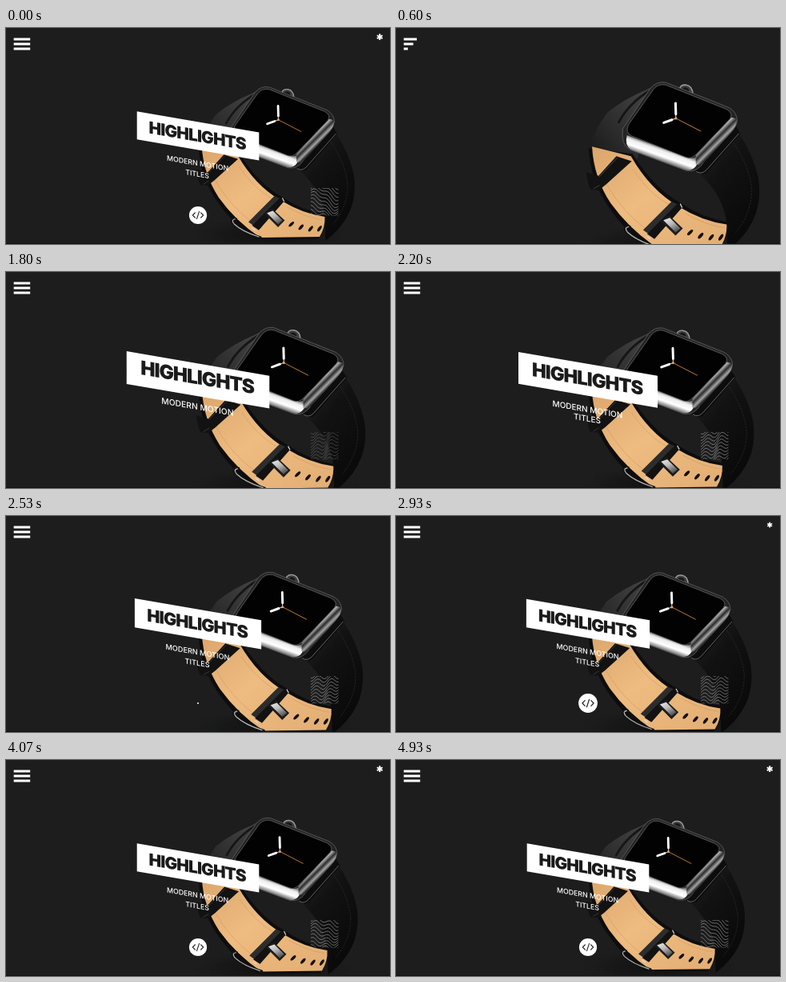
Recreate the animation shown at these times as an HTML page. Size 480 by 270 pixels, loop 4.99 s.

```html
<!DOCTYPE html>
<html lang="en">
<head>
<meta charset="utf-8">
<title>Highlights</title>
<style>
  html, body { margin: 0; width: 100%; height: 100%; overflow: hidden; background: #1d1d1d; }
  svg { display: block; width: 100vw; height: 100vh; }
  text { font-family: Inter, "Open Sans", sans-serif; text-anchor: middle; }
  .head { font-size: 20.8px; font-weight: 900; letter-spacing: -.87px; fill: #1b1b1b; }
  .sub { font-size: 8.8px; font-weight: 500; fill: #fff; }
  .line { fill: none; stroke-linecap: round; stroke-linejoin: round; }
</style>
</head>
<body>
<svg viewBox="0 0 480 270">
  <defs>
    <linearGradient id="tan" x1="0" y1="0" x2="1" y2="1">
      <stop offset="0" stop-color="#dba66b"/><stop offset=".45" stop-color="#eebb80"/><stop offset="1" stop-color="#e2ae73"/>
    </linearGradient>
    <linearGradient id="strap" x1="0" y1="0" x2=".6" y2="1">
      <stop offset="0" stop-color="#262626"/><stop offset=".4" stop-color="#121212"/><stop offset="1" stop-color="#090909"/>
    </linearGradient>
    <linearGradient id="back" x1="1" y1="0" x2="0" y2="1">
      <stop offset="0" stop-color="#4a4a4a"/><stop offset=".5" stop-color="#303030"/><stop offset="1" stop-color="#121212"/>
    </linearGradient>
    <linearGradient id="front" gradientUnits="userSpaceOnUse" x1="347" y1="154" x2="341" y2="171">
      <stop offset="0" stop-color="#777"/><stop offset=".25" stop-color="#eee"/><stop offset=".6" stop-color="#fff"/><stop offset="1" stop-color="#555"/>
    </linearGradient>
    <linearGradient id="side" gradientUnits="userSpaceOnUse" x1="393" y1="138" x2="402" y2="147">
      <stop offset="0" stop-color="#aaa"/><stop offset=".35" stop-color="#2c2c2c"/><stop offset=".7" stop-color="#a5a5a5"/><stop offset="1" stop-color="#222"/>
    </linearGradient>
    <linearGradient id="tang" x2=".6" y2="1">
      <stop offset="0" stop-color="#eee"/><stop offset=".5" stop-color="#bbb"/><stop offset="1" stop-color="#555"/>
    </linearGradient>
    <radialGradient id="shade">
      <stop offset="0" stop-color="#0f0f0f"/><stop offset=".6" stop-color="#151515" stop-opacity=".6"/><stop offset="1" stop-color="#1d1d1d" stop-opacity="0"/>
    </radialGradient>
    <clipPath id="square"><rect x="381" y="200" width="34.5" height="34.5"/></clipPath>
    <clipPath id="panelClip"><rect id="panelMask" x="-76.3" y="-17.5" width="152.6" height="35"/></clipPath>
  </defs>

  <rect width="480" height="270" fill="#1d1d1d"/>
  <rect y="269" width="480" height="1" fill="#190d12"/>

  <g id="watch">
    <ellipse cx="338" cy="268" rx="118" ry="26" fill="url(#shade)"/>
    <!-- far side of the strap -->
    <path d="M330 69L312 78Q285 89 264 106Q246 130 240 152L246 182L300 165Z" fill="url(#back)"/>
    <path d="M316 79Q290 95 278 118" class="line" stroke="#161616" stroke-width="3"/>
    <!-- near right strap -->
    <path d="M425 130Q444 158 450 186Q454 209 447 231Q437 258 412 276L411 245Q409 210 376 180Z" fill="url(#strap)"/>
    <path class="line" d="M419 143Q439 171 442 201Q442 230 422 254" stroke="#2e2e2e" stroke-width=".7" stroke-dasharray="2 2"/>
    <!-- tan lining -->
    <path d="M241 150Q243 190 265 222Q288 256 318 274L402 274Q415 258 412 241Q381 236 353 217Q321 199 295 157Z" fill="#0d0d0d"/>
    <path d="M245 148Q247 186 268 218Q291 250 324 272L404 271Q412 258 411 244Q381 240 352 222Q317 202 293 160Z" fill="url(#tan)"/>
    <path class="line" d="M263 194Q282 228 312 250M296 177Q316 207 344 222M361 231Q384 244 407 248" stroke="#c18f58" stroke-width=".6" stroke-dasharray="1.6 1.6"/>
    <!-- keeper -->
    <path d="M238 180L253 184L275 160L294 166L262 195L253 202L243 201Q239 192 238 180Z" fill="#121212"/>
    <path class="line" d="M254 185L276 162M247 200L254 196" stroke="#393939"/>
    <!-- buckle -->
    <path class="line" d="M291 247Q282 247 288 254Q300 265 324 272" stroke="#151515" stroke-width="4"/>
    <path class="line" d="M290 247Q284 248 289 254Q300 264 322 271" stroke="#b9b9b9" stroke-width="1.2"/>
    <path d="M308 251L343 216L357 222L322 261Z" fill="#2c2c2c"/>
    <path d="M313 256L350 219L357 222L322 262Z" fill="#121212"/>
    <path class="line" d="M354 219L356 223M313 259L317 262" stroke="#ddd" stroke-width="1.2"/>
    <path d="M330 240L340 233L357 249L348 258Z" fill="#1c1c1c"/>
    <path d="M333 239L341 236L354 249L348 254Z" fill="url(#tang)"/>
    <g id="holes" fill="#15100b"></g>
    <!-- crown -->
    <path d="M353 79Q353 71 361 71.5Q370 73 370 86Z" fill="#3c3c3c"/>
    <path class="line" d="M353 77Q354 71.5 361 72Q369 73 369.5 84" stroke="#9a9a9a" stroke-width="1.5"/>
    <ellipse cx="360" cy="79" rx="4.5" ry="4" fill="#161616"/>
    <!-- lug and case -->
    <path d="M370 176L422 122L428 132L386 181Q380 184 370 176Z" fill="#0d0d0d"/>
    <path class="line" d="M374 179Q380 183 386 177L426 132" stroke="#707070" stroke-width=".9"/>
    <path d="M317 76Q325 67 336 69L414 100Q424 106 424 116Q423 124 416 131L383 167Q375 180 362 178L292 152Q280 146 283 126Z" fill="#242424" stroke="#5c5c5c" stroke-width=".9"/>
    <path d="M288 134L361 161Q368 164 373 161L374 171Q369 179 360 177L293 152Q285 147 288 134Z" fill="url(#front)"/>
    <path d="M373 159L417 112L424 114Q423 124 416 131L383 167Q376 172 373 170Z" fill="url(#side)"/>
    <path class="line" d="M321 77Q327 70 336 72L411 102Q420 107 415 114L373 158Q367 164 360 161L294 135Q285 131 290 121Z" fill="#020202" stroke="#606060" stroke-width=".9" style="fill:#020202"/>
    <!-- dial -->
    <path class="line" d="M348.4 113.2L379 129" stroke="#d98a3c" stroke-width=".9"/>
    <path class="line" d="M348.4 113.2L348 94M348.4 113.2L333 118.8" stroke="#ddd"/>
    <path class="line" d="M348.4 108L348 94.5M343.5 115L333.5 118.6" stroke="#fff" stroke-width="3"/>
    <circle cx="348.4" cy="113.2" r="1.6" fill="#e3a15d"/>
  </g>

  <g id="waves" class="line" clip-path="url(#square)" stroke="#fff" stroke-width=".6"></g>

  <g id="title">
    <g transform="skewY(9.75)">
      <rect id="panel" x="-76.3" y="-17.5" width="152.6" height="35" fill="#fff"/>
      <g clip-path="url(#panelClip)"><text id="head" class="head" x="-.8" y="7.3">HIGHLIGHTS</text></g>
      <text id="sub1" class="sub" x="-.5" y="37.4">MODERN MOTION</text>
      <text id="sub2" class="sub" x="-.9" y="51">TITLES</text>
    </g>
  </g>

  <g id="icon">
    <circle r="11.1" fill="#fff"/>
    <path class="line" d="M-3.6 -3.2L-6.6 0L-3.6 3.2M3.6 -3.2L6.6 0L3.6 3.2M1.5 -4.4L-1.5 4.4" stroke="#1d1d1d" stroke-width="1.1"/>
  </g>

  <g id="burger" fill="#fff"></g>
  <path id="star" d="M0 -3.9V3.9M-3.4 -1.95L3.4 1.95M-3.4 1.95L3.4 -1.95" stroke="#fff" stroke-width="2"/>
</svg>
<script>
const LOOP = 4990, FPS = 15;
const $ = id => document.getElementById(id);
const set = (el, attrs) => { for (const k in attrs) el.setAttribute(k, attrs[k]); };
const add = (parent, tag, attrs = {}) => {
  const el = document.createElementNS("http://www.w3.org/2000/svg", tag);
  set(el, attrs);
  return parent.appendChild(el);
};
const clamp = v => Math.min(1, Math.max(0, v));
const easeOut = (t, from, to) => 1 - (1 - clamp((t - from) / (to - from))) ** 3;

// Linear interpolation through [time, value] steps
function track(t, steps) {
  let [t0, v0] = steps[0];
  for (const [t1, v1] of steps) {
    if (t < t1) return t1 === t0 ? v1 : v0 + (v1 - v0) * clamp((t - t0) / (t1 - t0));
    t0 = t1; v0 = v1;
  }
  return v0;
}

const TITLE = [[1270, 1.18], [1800, 1.17], [2130, 1.16], [2270, 1.12], [2400, 1.07],
               [2530, 1.037], [2670, 1.023], [3000, 1.008], [3400, 1]];
const ICON = [[2460, 0], [2530, .09], [2670, .55], [2800, .95], [3000, 1.13],
              [3200, 1.13], [3400, 1.1], [3730, 1.04], [4070, 1]];

const bars = [12, 18, 24].map(y => add($("burger"), "rect", { x: 9.7, y: y + .5, height: 3 }));
const waves = Array.from({ length: 22 }, () => add($("waves"), "path"));
[[366, 254], [379, 258], [392, 260], [404, 260]].forEach(([x, y], i) =>
  add($("holes"), "ellipse", { rx: 1.9, ry: 4.6, transform: `translate(${x} ${y}) rotate(${46 - i * 4})` }));

function drawWaves(t) {
  const p = clamp((t - 1700) / 3230);
  waves.forEach((path, i) => {
    let d = "";
    for (let x = 0; x <= 36; x += 1.5) {
      const bend = (3.2 - p) * Math.sin(x * .36 - 1 + p * 2.4 + i * .25);
      const slope = (30 * p - 16) / (1 + Math.exp((20 - x) / 5));
      const y = 176 + i * 4 + bend + slope + 2 * p * Math.sin(i * .5 + x * .12);
      d += `${d ? "L" : "M"}${381 + x} ${y.toFixed(2)}`;
    }
    set(path, { d });
  });
  set($("waves"), { opacity: .65 * track(t, [[1600, 0], [1800, .5], [2200, 1]]) });
}

function draw(t) {
  const zoom = (1 + .0000213 * (4930 - t)) / 1.078;
  set($("watch"), { transform: `translate(240 135) scale(${zoom}) translate(-240 -135)` });

  bars.forEach((bar, i) => set(bar, { width: 20.5 * easeOut(t, 420 + i * 70, 860 + i * 70) }));

  const height = 35 * easeOut(t, 900, 1570);
  set($("title"), { transform: `translate(240 134.8) scale(${track(t, TITLE)})` });
  set($("panel"), { height });
  set($("panelMask"), { height });
  set($("head"), { y: 7.3 - track(t, [[1340, 36], [1600, 7], [1800, 2.6], [2400, 0]]) });
  set($("sub1"), { y: 37.4 - track(t, [[1530, 14], [1800, 5.4], [2400, 0]]), opacity: clamp((t - 1560) / 200) });
  set($("sub2"), { y: 51 - track(t, [[1860, 10], [2530, .6], [2800, 0]]), opacity: clamp((t - 1880) / 260) });

  drawWaves(t);
  set($("icon"), { transform: `translate(240 234) scale(${track(t, ICON)})` });
  set($("star"), { transform: `translate(467.2 11.2) scale(${easeOut(t, 2720, 3170)})` });
}

// The loop opens by holding the closing pose for one step
function tick() {
  const step = Math.floor((performance.now() % LOOP + 5) * FPS / 1000);
  draw(step ? step * 1000 / FPS : LOOP);
  requestAnimationFrame(tick);
}
tick();
</script>
</body>
</html>
```
